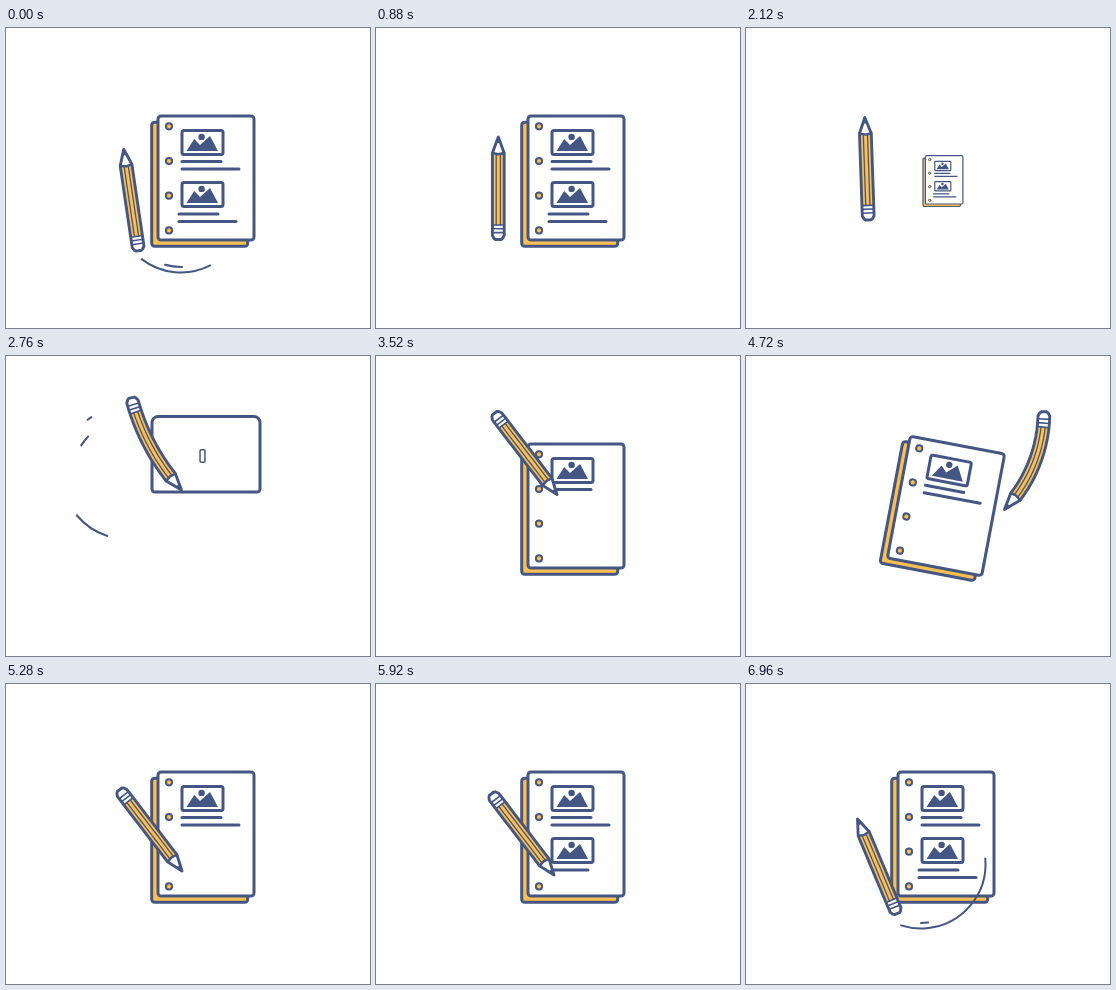
Recreate the animation shown at these times as an HTML page with a canvas. Size 364 by 300 pixels, loop 7 s.

```html
<!DOCTYPE html>
<html lang="en">
<head>
<meta charset="utf-8">
<title>Pencil and paper</title>
<style>
html, body { margin: 0; width: 100%; height: 100%; overflow: hidden; background: #fff; }
canvas { display: block; width: 364px; height: 300px; }
</style>
</head>
<body>
<canvas id="stage" width="364" height="300"></canvas>
<script>
const ctx = document.getElementById('stage').getContext('2d');
const INK = '#445683', YELLOW = '#fdbf4f', WHITE = '#fff';
const RAD = Math.PI / 180, LOOP = 7000, STEP = 40;

// Smooth monotone interpolation through rows of [time, ...values]
function track(rows, t) {
  const last = rows.length - 1;
  if (t <= rows[0][0]) return rows[0].slice(1);
  if (t >= rows[last][0]) return rows[last].slice(1);
  let i = 0;
  while (t >= rows[i + 1][0]) i++;
  const slope = (k, c) => (rows[k + 1][c] - rows[k][c]) / (rows[k + 1][0] - rows[k][0]);
  const tangent = (k, c) => {
    if (k === 0 || k === last) return 0;
    const a = slope(k - 1, c), b = slope(k, c);
    return a * b <= 0 ? 0 : 2 * a * b / (a + b);
  };
  const d = rows[i + 1][0] - rows[i][0], u = (t - rows[i][0]) / d, w = 1 - u;
  return rows[i].slice(1).map((v, j) => {
    const c = j + 1;
    return v * (1 + 2 * u) * w * w + rows[i + 1][c] * u * u * (3 - 2 * u)
      + d * u * w * (tangent(i, c) * w - tangent(i + 1, c) * u);
  });
}

// Two strokes of a paragraph, then the pencil rows that write them
const WRITE = -217.5;
const paragraph = (t, x, y) => [
  { x, y, len: 39, from: t, to: t + 280 },
  { x, y: y + 7.5, len: 57, from: t + 600, to: t + 920 }
];
const strokes = ([a, b]) => [
  [a.from, a.x, a.y, WRITE, 0], [a.to, a.x + a.len, a.y, WRITE, 0],
  [a.to + 160, a.x + 5, a.y + 5, WRITE, 0], [b.from - 40, b.x, b.y, WRITE, 0],
  [b.from, b.x, b.y, WRITE, 0], [b.to, b.x + b.len, b.y, WRITE, 0]
];
// Pencil turned about its resting middle
const rest = (t, a) => [t, 122.3 + 51.5 * Math.sin(a * RAD), 160.5 - 51.5 * Math.cos(a * RAD), a, 0];

const TEXT1 = paragraph(3080, 176, 133.5), TEXT2 = paragraph(5480, 173, 186);

// Rows of time, tip x, tip y, angle, bend
const SWING_IN = [
  [2320, 98, 62, -20, 0], [2480, 62, 90, -55, 10], [2560, 57, 118, -95, 12],
  [2600, 66, 153, -130, 15], [2640, 92, 175, -165, 22], [2720, 155, 132, -202, 28],
  [2760, 175.5, 134, -208.5, 28], [2880, 190, 212, -215, 10]
];
const FLICK = [
  [4120, 238, 146, -210, 0], [4360, 250, 141, -175, -20], [4640, 262, 151, -153, -30],
  [4720, 258.5, 153.5, -158, -44], [4880, 235, 160, -180, -25], [5080, 195, 175, -205, -10],
  [5280, 176, 187, WRITE, 0]
];
const SWING_OUT = [
  [6600, 200, 232, -212, 0], [6800, 172, 215, -180, 10], [6840, 152, 195, -140, 8],
  [6880, 133, 173, -95, 5], [6920, 115, 150, -52, 2], [6960, 111.5, 135, -22.7, 0],
  [7000, 117.7, 121.3, -8.4, 0]
];
const PENCIL = [
  rest(1800, 0), rest(1960, 4), ...SWING_IN, ...strokes(TEXT1), ...FLICK, ...strokes(TEXT2),
  ...SWING_OUT, rest(7160, 9.5), rest(7360, -3), rest(7520, 1), rest(7680, 0)
];

// Rows of time, top, bottom, width
const SHEET = [
  [2640, 58, 60, 122], [2680, 58, 74, 128], [2760, 60.5, 136, 108], [2880, 80, 225, 88],
  [3000, 92, 206, 100], [3120, 87, 214, 95], [3240, 88, 212, 96]
];
const BACK = [[2880, 0], [3240, 12], [3400, 5.5], [3500, 6.3]];
const TILT = [[4000, 0], [4400, 9], [4600, 10.7], [4720, 10.7], [4960, -1], [5120, 0]];
const SHRINK = [[1800, 1], [1900, 1.02], [2280, 0]];
// Rows of time, x scale, y scale, centre y
const PICTURE1 = [[2720, 0, .3, 96], [2760, .12, .52, 100], [3000, 1.1, 1.1, 116], [3120, 1, 1, 114.5]];
const PICTURE2 = [[5280, 0, 0, 166.5], [5440, 1.1, 1.1, 166.5], [5560, 1, 1, 166.5]];

// Rows of time, tail angle, head angle
const ARC_IN = [[2520, 238, 238], [2600, 225, 150], [2640, 205, 125], [2760, 140.6, 107.6], [2840, 100, 100]];
const DASH_IN = [[2560, 238, 238], [2640, 218, 238], [2760, 234, 238], [2800, 238, 238]];
const INNER_IN = [[2560, 224, 224], [2640, 195, 224], [2760, 212, 224], [2840, 224, 224]];
const ARC_OUT = [
  [6840, -10, -10], [6880, -8, 20], [6920, -6, 70], [6960, -5, 108],
  [7000, 63, 127.6], [7080, 125, 138], [7160, 142, 142]
];
const INNER_OUT = [[6920, 80, 80], [6960, 83, 90], [7000, 89, 105.6], [7080, 112, 112]];

function paint(fill, width) {
  if (fill) { ctx.fillStyle = fill; ctx.fill(); }
  if (width) { ctx.lineWidth = width; ctx.stroke(); }
}

function box(x, y, w, h, r, fill, width = 3) {
  ctx.beginPath();
  ctx.roundRect(x, y, w, h, r);
  paint(fill, width);
}

function poly(points, closed, fill, width) {
  ctx.beginPath();
  points.forEach(p => ctx.lineTo(...p));
  if (closed) ctx.closePath();
  paint(fill, width);
}

function picture(rows, t) {
  if (t <= rows[0][0]) return;
  const [sx, sy, y] = track(rows, t);
  const w = 41 * sx, h = 24 * sy;
  box(196.5 - w / 2, y - h / 2, w, h, Math.min(2, w / 4), WHITE, Math.min(3, 1 + 4 * sx));
  if (sx < .3) return;
  ctx.save();
  ctx.translate(196.5, y);
  ctx.scale(sx, sy);
  poly([[-16, 8.5], [-8.3, -3.5], [-2.5, 2.5], [7.5, -6.5], [15.5, 8.5]], true, INK);
  ctx.beginPath();
  ctx.arc(-.9, -5.6, 3.2, 0, 7);
  paint(INK);
  ctx.restore();
}

function paper(t) {
  if (t > 2280 && t <= 2640) return;
  const leaving = t <= 2280, u = leaving ? LOOP : t;
  const [top, bottom, w] = track(SHEET, u), x = 200 - w / 2;
  ctx.save();
  if (leaving) {
    const [s] = track(SHRINK, t);
    ctx.translate(197, 153);
    ctx.scale(s, s);
    ctx.translate(-197, -153);
  }
  ctx.translate(200, 150);
  ctx.rotate(track(TILT, u)[0] * RAD);
  ctx.translate(-200, -150);

  const [off] = track(BACK, u);
  if (off > 0) box(x - off, top + off, w, bottom - top, 3, YELLOW);
  const r = Math.max(3, (w - 96) / 2);
  box(x, top, w, bottom - top, [r, r, 3, 3], WHITE);

  for (let i = 0; i < 4; i++) {
    const start = 2900 + i * 40;
    const [s] = track([[start, 0], [start + 120, 1.2], [start + 200, 1]], u);
    if (s <= 0) continue;
    ctx.beginPath();
    ctx.arc(163, 98.3 + 34.7 * i, 3.1 * s, 0, 7);
    paint(YELLOW, 2);
  }
  picture(PICTURE1, u);
  picture(PICTURE2, u);
  for (const l of [...TEXT1, ...TEXT2]) {
    const [d] = track([[l.from, 0], [l.to, l.len]], u);
    if (d > 0) poly([[l.x, l.y], [l.x + d, l.y]], false, null, 3);
  }
  ctx.restore();
}

function trail(x, y, r, rows, t) {
  const [a, b] = track(rows, t);
  if (Math.abs(a - b) < .5) return;
  ctx.beginPath();
  ctx.arc(x, y, r, Math.min(a, b) * RAD, Math.max(a, b) * RAD);
  paint(null, 2);
}

function pencil(t) {
  const [x, y, angle, bend] = track(PENCIL, t);
  const a = angle * RAD, b = bend * RAD, L = 102.5, H = 5.9;
  const stretch = 1 + .07 * Math.abs(b);
  // Point at distance s behind the tip and v beside the curved axis
  const at = (s, v) => {
    const f = s / L, q = b * f / 2, h = a + b * (f - .5), m = a + b * (f - 1) / 2;
    const d = s * stretch * (Math.abs(q) < 1e-4 ? 1 : Math.sin(q) / q);
    return [x - d * Math.sin(m) + v * Math.cos(h), y + d * Math.cos(m) + v * Math.sin(h)];
  };
  const side = (from, to, v) =>
    Array.from({ length: 13 }, (_, i) => at(from + (to - from) * i / 12, v));
  const outline = [
    at(0, 0), ...side(16, L - 4, -H), at(L - 1.2, -H + 1.6), at(L, -2.8),
    at(L, 2.8), at(L - 1.2, H - 1.6), ...side(L - 4, 16, H)
  ];
  poly(outline, true, WHITE);
  poly([...side(16, 88, -H), ...side(88, 16, H)], true, YELLOW);
  for (const v of [-2.1, 2.1]) poly(side(17, 88, v), false, null, 1.3);
  poly([at(16, -H), at(17.2, 0), at(16, H)], false, null, 2.4);
  for (const s of [88, 91.8, 95.6]) poly([at(s, -H), at(s, H)], false, null, 1.6);
  poly([at(0, 0), at(6, -2.2), at(6, 2.2)], true, INK);
  poly(outline, true, null, 2.9);
}

function draw(now) {
  const clock = Math.floor(now % LOOP / STEP) * STEP;
  const t = clock < 900 ? clock + LOOP : Math.max(clock, 1800);
  ctx.fillStyle = WHITE;
  ctx.fillRect(0, 0, 364, 300);
  ctx.strokeStyle = INK;
  ctx.lineCap = ctx.lineJoin = 'round';
  paper(t);
  trail(121, 118, 65, ARC_IN, t);
  trail(121, 118, 67, DASH_IN, t);
  trail(121, 118, 54, INNER_IN, t);
  trail(175, 180, 64.5, ARC_OUT, t);
  trail(175, 180, 59, INNER_OUT, t);
  pencil(t);
}

let begin;
function frame(now) {
  begin ??= now;
  draw(now - begin);
  requestAnimationFrame(frame);
}
draw(0);
requestAnimationFrame(frame);
</script>
</body>
</html>
```
